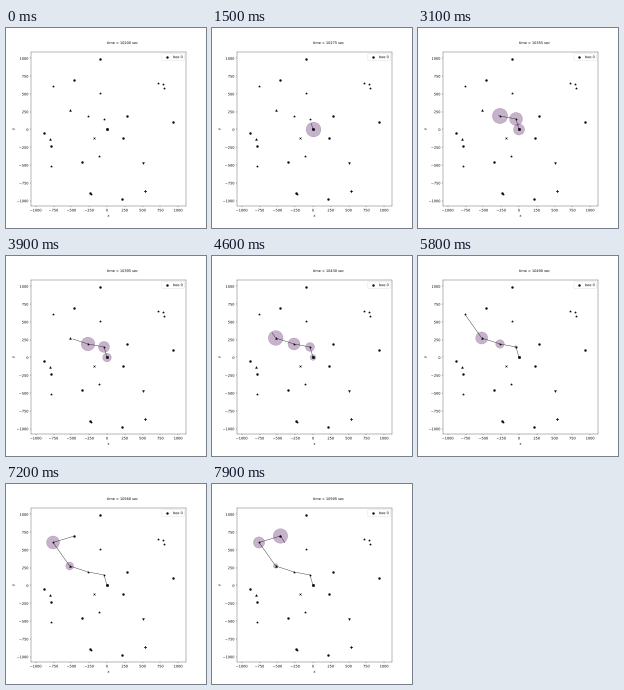
Write a matplotlib script that moves like this. It is 200 px wide and 200 px high and loops after 8000 ms.

```python
import numpy as np
import matplotlib.pyplot as plt
from matplotlib.animation import FuncAnimation
from matplotlib.patheffects import Normal
from matplotlib.ticker import MultipleLocator

# Path effects and no snapping give subpixel placing of text and markers.
plt.rcParams.update({
    "font.family": "DejaVu Sans",
    "font.size": 10,
    "path.snap": False,
    "path.effects": [Normal()],
})

FRAMES = 80
STEP = 5            # simulated seconds per frame
START = 10200
SPEED = 25          # distance flown per frame
TAKEOFF = 11.5      # frame of the first departure
REST = 1.6          # frames spent on each flower
LIFE = 40           # frames until a scent mark has faded
MARK_SIZE = 2000
FLOWER_SIZE = 32

NEST = (0, 0)
VISITED = [(-42, 148), (-267, 190), (-524, 274), (-758, 604), (-457, 695)]
VISITED_SHAPES = "**^*o"
OTHERS = {
    "o": [(-105, 990), (281, 183), (225, -118), (-885, -49), (-786, -225),
          (-351, -456), (927, 105), (211, -975), (-239, -898)],
    "*": [(-105, 512), (-793, -512), (-119, -379), (716, 653), (786, 639),
          (800, 583), (-218, -912)],
    "^": [(-800, -133)],
    "x": [(-183, -119)],
    "v": [(512, -470)],
    "P": [(527, -863)],
}

# Each leg takes its length over the speed, then a short rest.
route = np.array([NEST, *VISITED, NEST], float)
legs = np.diff(route, axis=0)
flight_time = np.hypot(*legs.T) / SPEED
leave = TAKEOFF + np.append(0, np.cumsum(flight_time[:-1] + REST))

fig = plt.figure(figsize=(8, 8), dpi=25)
ax = fig.add_subplot()
ax.set(xlim=(-1067, 1109), ylim=(-1074, 1088), xlabel="x", ylabel="y")
for axis in (ax.xaxis, ax.yaxis):
    axis.set_major_locator(MultipleLocator(250))


def plant(spots, shape="o", size=FLOWER_SIZE, **style):
    xy = np.reshape(spots, (-1, 2))
    ax.scatter(*xy.T, s=size, marker=shape, color="black", zorder=3, **style)


for spot, shape in zip(VISITED, VISITED_SHAPES):
    plant(spot, shape)
for shape, spots in OTHERS.items():
    plant(spots, shape)
plant(NEST, size=55)
plant([], label="bee 0")
ax.legend(loc="upper right")

marks = ax.scatter([], [], color="#440154", alpha=0.3, zorder=1)
trail, = ax.plot([], [], color="black", lw=1, zorder=2)
clock = ax.text(0, 1200, "")


def draw(i):
    clock.set_text(f"time = {START + STEP * i} sec")

    age = i - leave
    part = np.clip(age / flight_time, 0, 1)
    bee = route[:-1] + part[:, None] * legs
    trail.set_data(*np.vstack([NEST, bee[age >= 0]]).T)

    live = (age >= 0) & (age < LIFE)
    marks.set_visible(live.any())
    marks.set_offsets(route[:-1][live])
    marks.set_sizes(MARK_SIZE * (1 - age[live] / LIFE))
    return marks, trail, clock


anim = FuncAnimation(fig, draw, frames=FRAMES, interval=100,
                     repeat=True, repeat_delay=0)
plt.show()
```
